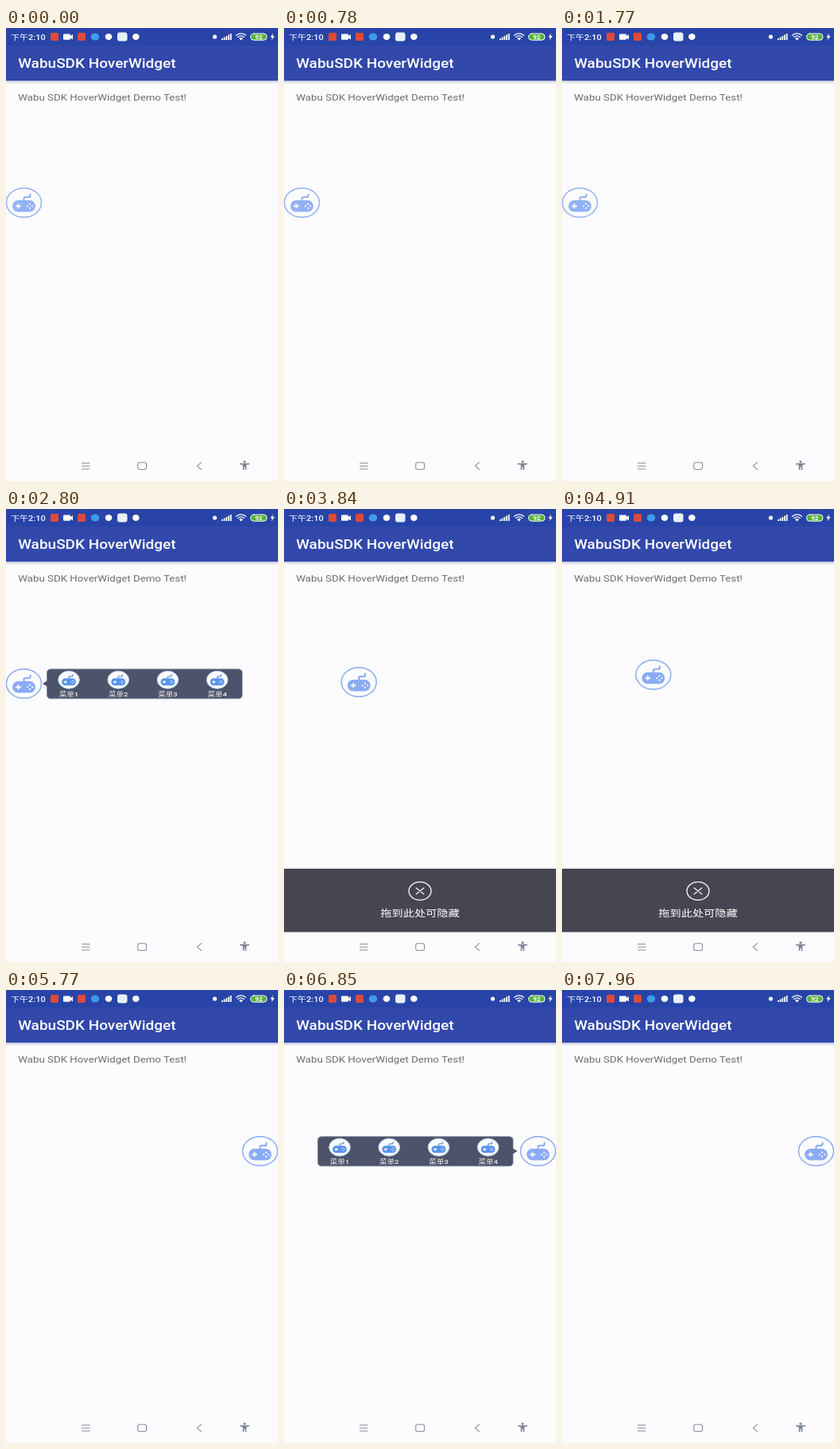
An HTML page that plays this animation: 342x568 px, repeating every 8000 ms.

```html
<!DOCTYPE html>
<html lang="zh">
<head>
<meta charset="utf-8">
<title>Float menu</title>
<style>
  html, body { margin: 0; width: 100%; height: 100%; overflow: hidden; background: #fcfcfe; }
  svg { display: block; width: 100vw; height: 100vh; }
  text { font-family: Roboto, "Noto Sans CJK SC", sans-serif; }
  .line { fill: none; stroke-linecap: round; stroke-linejoin: round; }
</style>
</head>
<body>
<svg id="stage" viewBox="0 0 342 568" preserveAspectRatio="none">
  <defs>
    <linearGradient id="shade" x2="0" y2="1">
      <stop offset="0" stop-color="#c3c6de"/>
      <stop offset="1" stop-color="#fcfcfe"/>
    </linearGradient>
    <g id="pad">
      <rect x="-14.3" y="-3" width="28.6" height="14.4" rx="7" ry="6.6" fill="currentColor"/>
      <path class="line" d="M0-3V-5.5Q0-7 2-7H6Q8-7 8-8.8V-10.5" stroke="currentColor" stroke-width="2.1"/>
      <path d="M-10.5 4.3H-3.5M-7 1.3V7.3" stroke="#fff" stroke-width="1.8"/>
      <g fill="#fff">
        <circle cx="7.6" cy="1.7" r="1.1"/><circle cx="7.6" cy="6.9" r="1.1"/>
        <circle cx="4.5" cy="4.3" r="1.1"/><circle cx="10.7" cy="4.3" r="1.1"/>
      </g>
    </g>
  </defs>
  <rect width="342" height="568" fill="#fcfcfe"/>
  <rect y="66" width="342" height="4" fill="url(#shade)"/>
  <rect width="342" height="66" fill="#3248aa"/>
  <rect width="342" height="22" fill="#2844a8"/>

  <g id="status" fill="#fff">
    <rect x="56" y="6" width="10" height="10" rx="1.5" fill="#dc4a3c"/>
    <path d="M73 7.5H80Q81 7.5 81 8.5V10L84 8V14.5L81 12.5V13.8Q81 14.8 80 14.8H73Q72 14.8 72 13.8V8.5Q72 7.5 73 7.5Z"/>
    <rect x="90" y="6" width="10" height="10" rx="1.5" fill="#dc4a3c"/>
    <ellipse cx="112" cy="11" rx="5.3" ry="4.6" fill="#3f9be8"/>
    <ellipse cx="129" cy="11" rx="4.3" ry="4"/>
    <rect x="140" y="5.5" width="12.5" height="11" rx="3" fill="#e8f0fc"/>
    <ellipse cx="163.3" cy="11" rx="4.3" ry="4"/>
    <circle cx="262.5" cy="11" r="2.6"/>
    <g class="line" stroke="#fff" stroke-width="1.3">
      <path d="M289.5 9.2Q295.5 4.6 301.5 9.2M291.5 11.4Q295.5 8.2 299.5 11.4"/>
      <rect x="307.5" y="7" width="20.5" height="8.2" rx="4" stroke-width="1" fill="#58b03a"/>
    </g>
    <path d="M293 13L295.5 15.4L298 13Q295.5 11.2 293 13Z"/>
    <path d="M336 6.5L332.3 11.6H334.7L333.7 15.5L337.8 10H335.2Z"/>
  </g>

  <g class="line" stroke="#8b8d9c" stroke-width="1.1">
    <path d="M95.5 545.5H105M95.5 549.2H105M95.5 553H105"/>
    <rect x="165.7" y="544.7" width="10.8" height="8.8" rx="2.2"/>
    <path d="M245.5 544.7L240.3 549.1L245.5 553.5"/>
  </g>
  <g fill="#7c8496">
    <ellipse cx="300" cy="543.9" rx="1.6" ry="1.4"/>
    <path d="M294 545.7H306V547.2L302.3 547.7V554H300.7V550.5H299.3V554H297.7V547.7L294 547.2Z"/>
  </g>

  <g id="drop">
    <rect y="451" width="342" height="79.5" fill="#464652"/>
    <ellipse cx="171" cy="479" rx="14" ry="11.4" fill="none" stroke="#fff" stroke-width="1.3"/>
    <path class="line" d="M166 475L176 483M176 475L166 483" stroke="#fff" stroke-width="1.1"/>
  </g>

  <g id="menu">
    <rect width="245.5" height="37" rx="5" ry="4" fill="#4c536a" stroke="#7d8798" stroke-width=".8"/>
    <path id="tip" fill="#4c536a"/>
  </g>

  <g id="ball" color="#8aabf6">
    <ellipse rx="22" ry="18.3" fill="#fdfdff" stroke="#86a9f2" stroke-width="1.4"/>
    <use href="#pad"/>
  </g>
</svg>
<script>
const LOOP = 8000;
const $ = id => document.getElementById(id);

function add(parent, tag, attrs, content = "") {
  const el = document.createElementNS("http://www.w3.org/2000/svg", tag);
  for (const k in attrs) el.setAttribute(k, attrs[k]);
  el.textContent = content;
  return parent.appendChild(el);
}

// Text uses the stage's 360 x 720 dp proportions.
function label(parent, str, x, y, size, fill, weight = 400, anchor = "start") {
  add(parent, "text", {
    transform: `translate(${x} ${y}) scale(.95 .789)`,
    "font-size": size, "font-weight": weight, "text-anchor": anchor, fill
  }, str);
}

label($("status"), "下午2:10", 6, 14.8, 11.6, "#fff", 500);
label($("status"), "92", 317.8, 14, 9, "#fff", 700, "middle");
label($("stage"), "WabuSDK HoverWidget", 15.2, 50.3, 20, "#fff", 500);
label($("stage"), "Wabu SDK HoverWidget Demo Test!", 15.2, 90.5, 14, "#6c6c70");
label($("drop"), "拖到此处可隐藏", 171, 510.6, 15, "#fff", 400, "middle");

for (let i = 0; i < 5; i++) {
  const h = 2 + i * 1.5;
  add($("status"), "rect", { x: 271 + i * 2.7, y: 15 - h, width: 1.8, height: h });
}

for (let i = 0; i < 4; i++) {
  const x = 27.5 + i * 62.2;
  add($("menu"), "ellipse", { cx: x, cy: 13.4, rx: 13.3, ry: 11, fill: "#fcfcff", stroke: "#b9d0f0", "stroke-width": 1 });
  add($("menu"), "use", { href: "#pad", transform: `translate(${x} 13.4) scale(.62)`, color: "#5794ea" });
  label($("menu"), "菜单" + (i + 1), x, 34.4, 10, "#f4efea", 500, "middle");
}

// Time, x, y of the ball: each drag ends in a snap to the nearer edge.
const path = [
  [0, 22.5, 219],
  [3480, 22.5, 219], [4150, 151, 215.4], [4380, 22.5, 215.4],
  [4500, 22.5, 215.4], [5250, 184, 202], [5500, 319.5, 202],
  [LOOP, 319.5, 202]
];
const drags = [[3510, 4170], [4530, 5270]];
const menus = [[2000, 3200], [6200, 7640]];

function ballAt(t) {
  const i = path.findIndex(p => p[0] > t);
  const [a, b] = [path[i - 1], path[i]];
  const u = (t - a[0]) / (b[0] - a[0]);
  const e = u * u * (3 - 2 * u);
  return [a[1] + (b[1] - a[1]) * e, a[2] + (b[2] - a[2]) * e];
}

function showDuring(el, spans, t) {
  const on = spans.some(([from, to]) => t >= from && t < to);
  el.setAttribute("visibility", on ? "visible" : "hidden");
}

function draw(t) {
  const [x, y] = ballAt(t);
  const right = x > 171;
  $("ball").setAttribute("transform", `translate(${x} ${y})`);
  $("ball").setAttribute("opacity", t < menus[0][0] ? 0.92 : 1);
  $("menu").setAttribute("transform", `translate(${right ? 42.5 : 51.5} ${y - 18.2})`);
  $("tip").setAttribute("d", right ? "M245 14.5L251 18.2L245 22Z" : "M.5 14.5L-5.5 18.2L.5 22Z");
  showDuring($("menu"), menus, t);
  showDuring($("drop"), drags, t);
}

const start = performance.now();
function tick() {
  draw((performance.now() - start) % LOOP);
  requestAnimationFrame(tick);
}
tick();
</script>
</body>
</html>
```
